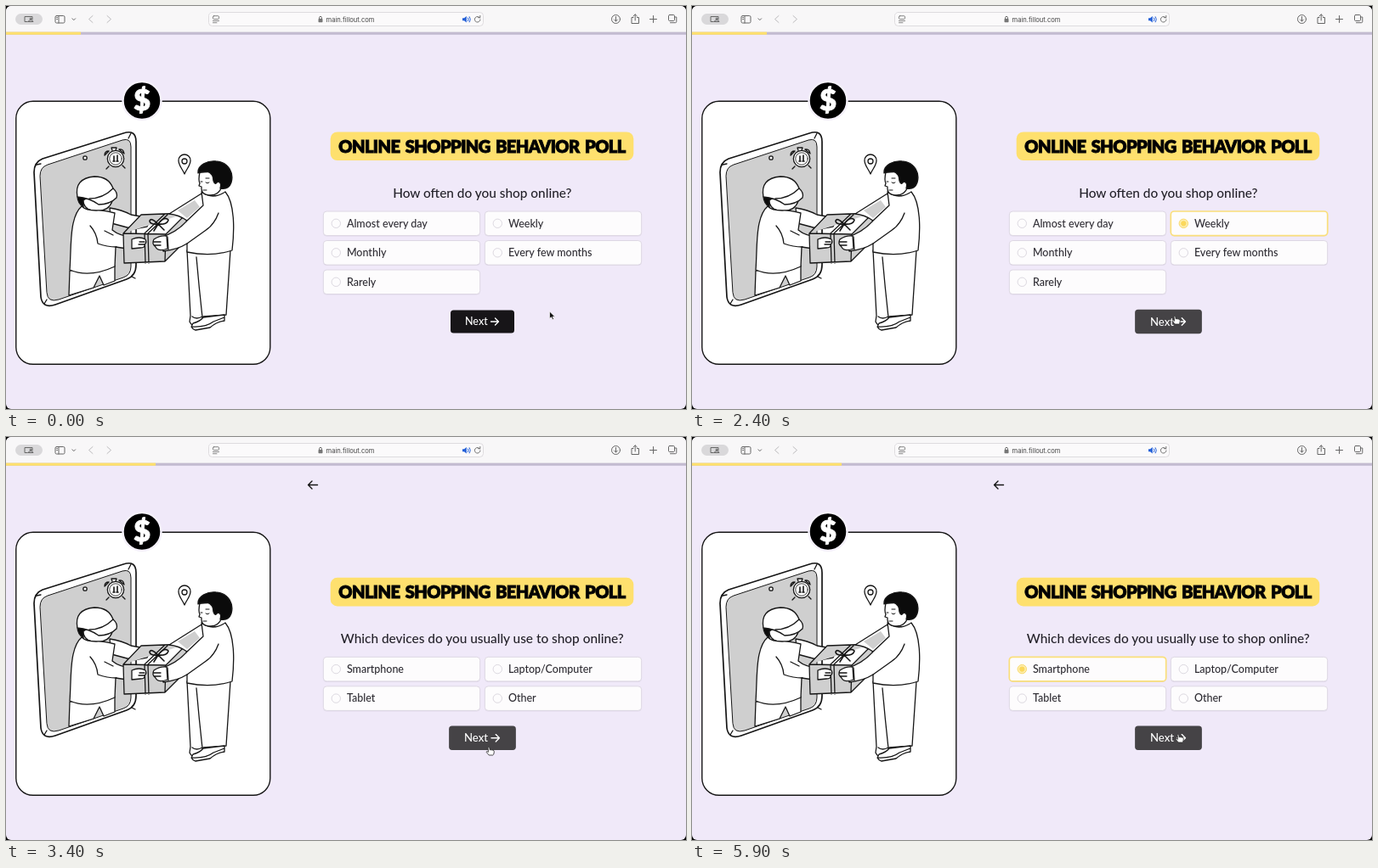
Write an HTML page that moves like this. It is 800x475 px and loops after 6 s.

```html
<!DOCTYPE html>
<html lang="en">
<head>
<meta charset="utf-8">
<title>Online shopping poll</title>
<style>
  html, body { margin: 0; width: 100%; height: 100%; overflow: hidden; background: #000; }
  svg { display: block; width: 800px; height: 475px; border-radius: 6px; font-family: Lato, sans-serif; }
  .line, .icon { fill: none; stroke-linecap: round; stroke-linejoin: round; }
  .line { stroke: #161616; stroke-width: 1.3; }
  .line .white { fill: #fff; }
  .line .gray { fill: #cfcfcf; }
  .line .black { fill: #0b0b0b; }
  .icon { stroke: #666; stroke-width: 1; }
  .title { font-size: 20px; font-weight: 900; letter-spacing: -.6px; word-spacing: 2.5px; stroke: #090909; stroke-width: .9; }
  .question { font-size: 15.4px; font-weight: 500; fill: #24222a; }
  .label { font-size: 12.5px; font-weight: 500; fill: #2e2c33; }
  .mid { text-anchor: middle; }
</style>
</head>
<body>
<svg viewBox="0 0 800 475">
  <rect width="800" height="475" fill="#f0e9f9"/>
  <rect width="800" height="31" fill="#f8f7f8"/>
  <rect y="30.6" width="800" height="3.2" fill="#c3bbd0"/>
  <rect id="progress" y="30.6" width="88" height="3.2" fill="#fee06e"/>

  <g class="icon">
    <rect x="11" y="9" width="32" height="13" rx="6.5" fill="#d9d8da" stroke="none"/>
    <path d="M31 16v-3.500h-9v6h3M26 18.500h6q-1-2-3-2t-3 2"/><circle cx="29" cy="15" r="1"/>
    <rect x="58" y="11.500" width="11" height="8.500" rx="1.500"/><path d="M62 11.500v8.500M59.700 13.500h.8M59.700 15.500h.8M78 14.800l1.800 1.800 1.800-1.800"/>
    <path d="M102 11.500l-4.500 4 4.500 4M119 11.500l4.500 4-4.500 4" stroke="#bdbcbe"/>
    <rect x="238.500" y="7.500" width="323" height="16" rx="4" fill="#fbfafb" stroke="#dedcdf"/>
    <rect x="243.500" y="11.700" width="7" height="3.800" rx="1" stroke-width=".8"/><path d="M243.500 17.500h7M243.500 19.700h4.500" stroke-width=".8"/>
    <rect x="367.500" y="15" width="5" height="4.200" rx=".8" fill="#777" stroke="none"/><path d="M368.600 15v-1.300a1.400 1.400 0 0 1 2.800 0V15"/>
    <path d="M537 14.300h2l2.800-2.300v7.600l-2.800-2.300h-2z" fill="#2460d8" stroke="none"/>
    <path d="M543.500 14q1.300 1.800 0 3.600M545.300 12.700q2.200 3 0 6.200" stroke="#2460d8"/>
    <path d="M557.500 14a3.300 3.300 0 1 0 .5 2M555.500 13.700h2.300v-2.300" stroke-width=".9"/>
    <circle cx="717.500" cy="15.500" r="5"/><path d="M717.500 12.500v5.500M715.500 16l2 2 2-2"/>
    <path d="M738 13.500h-2v7h8.500v-7h-2M740.200 17v-7M738 12l2.200-2.200 2.200 2.200M757.500 15.500h8M761.500 11.500v8"/>
    <rect x="779.500" y="10.500" width="7" height="7" rx="1.200"/><path d="M781.500 19.700h6q1.300 0 1.300-1.300v-5.400h-2"/>
  </g>
  <text x="376.500" y="18.700" style="font:7.6px Inter,sans-serif" fill="#444">main.fillout.com</text>

  <rect x="11.800" y="112.300" width="299" height="310" rx="20" fill="#fff" stroke="#161616" stroke-width="1.400"/>
  <circle cx="160" cy="111.500" r="22.500" fill="#000" stroke="#f4f0fa" stroke-width="2.500"/>
  <text class="mid" x="160" y="122.700" font-size="34" font-weight="900" fill="#fff" stroke="#fff" stroke-width=".9">$</text>

  <g class="line">
    <!-- phone -->
    <path class="white" stroke-width="1.700" d="M33 196Q33 184 43 180L138 150Q153 145 153 160L153 305Q153 318 142 322L58 352Q43 357 41 343Z"/>
    <path class="gray" stroke-width="1" d="M40 200Q40 190 49 187L137 158Q147 155 147 166L147 307Q147 317 138 320L62 346Q49 350 48 338Z"/>
    <path d="M36 187l5-1M45 351l3-5M148 319l4 2M147 150l-3 6"/>
    <circle class="white" cx="93" cy="179" r="2.200"/>
    <path class="white" d="M116 176q0-5 5-5zM133 169q5-1 6 5zM121 189l-3 3M137 188l3 3M125 170l-1-3h6l-1 3"/>
    <circle class="white" cx="129" cy="180" r="9.700"/><circle cx="129" cy="180" r="7.200" stroke-width=".8"/>
    <path stroke-width="1.600" d="M127 177v5M131 176v6M126 183h2M130 183h2"/>

    <!-- courier -->
    <path class="white" d="M75 312L74 341 103 332 110 318 115 329 128 324V306Z"/>
    <path class="white" d="M122 238Q136 240 147 246L164 249Q171 252 166 260L150 263 124 256Z"/>
    <path class="white" d="M90 226Q91 239 101 241Q120 244 125 230Z"/>
    <path class="black" d="M84 224Q84 232 91 237L91 229 96 226Z"/>
    <path class="white" d="M84 225Q80 203 104 201Q121 201 126 215Q132 220 130 226Q122 234 109 234Q98 226 84 225Z"/>
    <path d="M98 227Q114 227 126 215"/>
    <path class="white" d="M89 236C74 249 77 286 75 311Q98 321 128 307L129 284 149 287 151 273Q133 271 125 264L128 244Q112 240 106 241Q94 241 89 236Z"/>
    <path d="M99 259Q107 268 108 280Q119 284 130 284M116 265L126 270"/>

    <!-- parcel -->
    <path class="gray" d="M138 268L159 246 213 244 211 277 187 301 139 303ZM138 268L188 269 213 244M188 269L187 301M163 268L164 303M167 268L168 303M163 268L187 245M167 268L191 245"/>
    <path stroke-width="1.600" d="M179 257Q171 249 169 253Q169 258 179 257Q186 247 191 252Q190 258 179 257L174 265M179 257L186 264"/>
    <path class="white" d="M148 275Q157 271 164 275Q166 279 163 281Q164 285 158 285L148 286ZM157 278h6M156 281h7"/>

    <!-- customer -->
    <path class="white" d="M213 288L217 365 216 372Q219 379 228 378L232 366 259 364 264 288Z"/>
    <path d="M224 296Q227 331 231 367M219 366Q224 370 231 366"/>
    <path class="white" d="M232 367Q228 372 220 374Q216 380 223 382L240 379Q248 372 257 371V364ZM218 378Q235 379 244 372L257 367"/>
    <path class="white" d="M230 221L192 245Q203 246 213 253L235 238Z"/>
    <path class="gray" stroke="none" d="M222 229L202 241 213 250 228 237Z"/>
    <path class="white" d="M230 219Q243 229 258 219C269 232 269 263 266 288Q242 296 213 290L213 280Q202 287 185 289L181 273Q201 267 213 253L232 235Z"/>
    <path d="M250 244Q245 258 234 265L213 280M190 272L191 287"/>
    <path class="white" d="M189 271Q181 270 174 275Q171 280 176 284Q179 290 190 286ZM174 278h8M174 282h8"/>
    <path class="white" d="M228 196Q226 205 228 209L227 212 230 213Q229 223 241 223Q250 223 254 213L247 195Z"/>
    <path class="black" d="M226 197C225 187 238 182 247 183C263 184 268 198 265 208Q262 217 252 215Q254 207 249 207Q246 212 244 206Q244 198 237 195Q230 195 226 197Z"/>
    <path d="M235 208q2 2 4 0M229 207h2M232 217h4M235 203h4" stroke-width="1"/>
    <path class="white" d="M210 198C207 191 203 188 203 182A7 7 0 0 1 217 182C217 188 213 191 210 198Z"/>
    <circle cx="210" cy="183" r="3"/>
  </g>

  <path id="back" class="icon" d="M366.500 56.500H355.500M360 52l-4.500 4.500 4.500 4.500" style="stroke:#151515;stroke-width:1.400"/>
  <g id="pages"></g>
  <g id="cursor" stroke-linejoin="round">
    <path id="arrow" d="M0 0V8.500L2 6.700 3.500 9.700 5 9 3.600 6.200H6.300Z" fill="#111" stroke="#fff" stroke-width=".7"/>
    <path id="hand" d="M-1.500 5.500L-2 1Q-1.300-.6-.3 .8L.3 4Q1.300 3 2.200 4Q3.400 3.300 4 4.500Q5.200 4.200 5.300 5.700L5 8Q4.500 9.800 3.800 10H-.8Q-2 8.500-4 6.300Q-3.500 4.700-1.500 6.300Z" fill="#fff" stroke="#222" stroke-width=".8"/>
  </g>
</svg>
<script>
const LOOP = 6000, SWAP = 2740, PITCH = 34.5;
const $ = id => document.getElementById(id);
const clamp = v => Math.max(0, Math.min(1, v));
const smooth = v => v * v * (3 - 2 * v);
const mix = (a, b, k) => a + (b - a) * k;

const pages = [
  { top: 149, question: 'How often do you shop online?', pick: 1, pickAt: 1700,
    labels: ['Almost every day', 'Weekly', 'Monthly', 'Every few months', 'Rarely'] },
  { top: 166.3, question: 'Which devices do you usually use to shop online?', pick: 0, pickAt: 4850,
    labels: ['Smartphone', 'Laptop/Computer', 'Tablet', 'Other'] }
];
// Pointer stops: time, x, y
const stops = [[800, 639.5, 360], [1500, 614, 263.5], [1800, 614, 263.5], [2200, 569, 365], [3900, 569, 365],
  [4400, 596, 274.5], [4700, 596, 274.5], [4880, 480, 274.5], [5300, 480, 274.5], [5800, 573, 350]];

function buildPage(page) {
  const { top, question, labels } = page;
  page.boxes = labels.map((_, i) => ({ x: i % 2 ? 563.3 : 373.3, y: top + 93 + (i >> 1) * PITCH, w: 184.4, h: 28.6 }));
  const mid = page.mid = top + 154 + (Math.ceil(labels.length / 2) - 1) * PITCH;
  page.button = { x: 523, y: mid - 13.5, w: 75, h: 27 };
  const options = page.boxes.map(({ x, y, w, h }, i) => `<g class="option">
    <rect x="${x}" y="${y + 1}" width="${w}" height="${h}" rx="4" fill="#d8d0e2" opacity=".6"/>
    <rect class="box" x="${x}" y="${y}" width="${w}" height="${h}" rx="4"/>
    <circle class="ring" cx="${x + 15}" cy="${y + 14.3}" r="5.2"/>
    <circle class="dot" cx="${x + 15}" cy="${y + 14.3}" r="3.1" fill="#fbd85c"/>
    <text class="label" x="${x + 27.6}" y="${y + 18.6}">${labels[i]}</text></g>`).join('');
  const el = page.el = document.createElementNS('http://www.w3.org/2000/svg', 'g');
  el.innerHTML = `<rect x="381.7" y="${top - .5}" width="356.6" height="33.6" rx="8" fill="#fee06e"/>
    <text class="title mid" x="560" y="${top + 23.9}">ONLINE SHOPPING BEHAVIOR POLL</text>
    <text class="question mid" x="560.3" y="${top + 77}">${question}</text>${options}
    <g class="next"><rect x="523" y="${mid - 13.5}" width="75" height="27" rx="3.5"/>
    <text class="label" x="540" y="${mid + 4.4}" style="fill:#fff">Next</text>
    <path class="icon" d="M570.5 ${mid}h9m-4-4l4 4-4 4" style="stroke:#fff;stroke-width:1.3"/></g>`;
  page.options = [...el.querySelectorAll('.option')];
  page.next = el.querySelector('.next');
  $('pages').append(el);
}
pages.forEach(buildPage);

const pageAt = t => pages[t < SWAP ? 0 : 1];
const inside = ([x, y], b) => x >= b.x && x <= b.x + b.w && y >= b.y && y <= b.y + b.h;

function pointer(t) {
  const i = stops.findIndex(s => s[0] > t);
  if (i < 0) return stops[stops.length - 1].slice(1);
  if (!i) return stops[0].slice(1);
  const a = stops[i - 1], b = stops[i], k = smooth((t - a[0]) / (b[0] - a[0]));
  return [mix(a[1], b[1], k), mix(a[2], b[2], k)];
}

// Share of the last 120 ms spent over a box, which eases the hover style.
function hover(t, box) {
  let hits = 0;
  for (let k = 0; k < 8; k++) hits += inside(pointer(t - k * 15), box(pageAt(t - k * 15)));
  return hits / 8;
}

function drawPage(page, t) {
  page.options.forEach((el, i) => {
    const on = i === page.pick ? clamp((t - page.pickAt) / 100) : 0;
    const over = on ? 0 : hover(t, () => page.boxes[i]);
    const box = el.querySelector('.box'), ring = el.querySelector('.ring');
    const shade = mix(253, 239, over);
    box.setAttribute('fill', `rgb(${shade},${shade - 1},${shade})`);
    box.setAttribute('stroke', on ? '#fadf7b' : '#ddd7e3');
    box.setAttribute('stroke-width', on ? 1.7 : 1);
    ring.setAttribute('fill', on ? '#fdeeb0' : 'none');
    ring.setAttribute('stroke', on ? '#f9d866' : '#dcd8e0');
    el.querySelector('.dot').setAttribute('opacity', on);
  });
  const over = hover(t, p => p.button), scale = 1 + .05 * over, shade = mix(23, 69, over);
  page.next.setAttribute('transform', `translate(560.5 ${page.mid}) scale(${scale}) translate(-560.5 ${-page.mid})`);
  page.next.firstChild.setAttribute('fill', `rgb(${shade},${shade - 2},${shade + 1})`);
}

function draw(t) {
  const page = pageAt(t), second = page === pages[1];
  const alpha = second ? clamp((t - SWAP) / 350) : 1 - clamp((t - 2600) / 140);
  const scale = .99 + .01 * alpha;
  pages.forEach(p => p.el.style.display = p === page ? '' : 'none');
  page.el.setAttribute('opacity', alpha);
  page.el.setAttribute('transform', `translate(560 267) scale(${scale}) translate(-560 -267)`);
  drawPage(page, t);
  $('back').style.display = second ? '' : 'none';
  $('progress').setAttribute('width', 88 * (2 - (1 - clamp((t - 2600) / 650)) ** 3));

  const at = pointer(t), active = [...page.boxes, page.button].some(b => inside(at, b));
  $('cursor').setAttribute('transform', `translate(${at})`);
  $('hand').style.display = active ? '' : 'none';
  $('arrow').style.display = active ? 'none' : '';
}

const start = performance.now();
(function frame() {
  draw((performance.now() - start) % LOOP);
  requestAnimationFrame(frame);
})();
</script>
</body>
</html>
```
